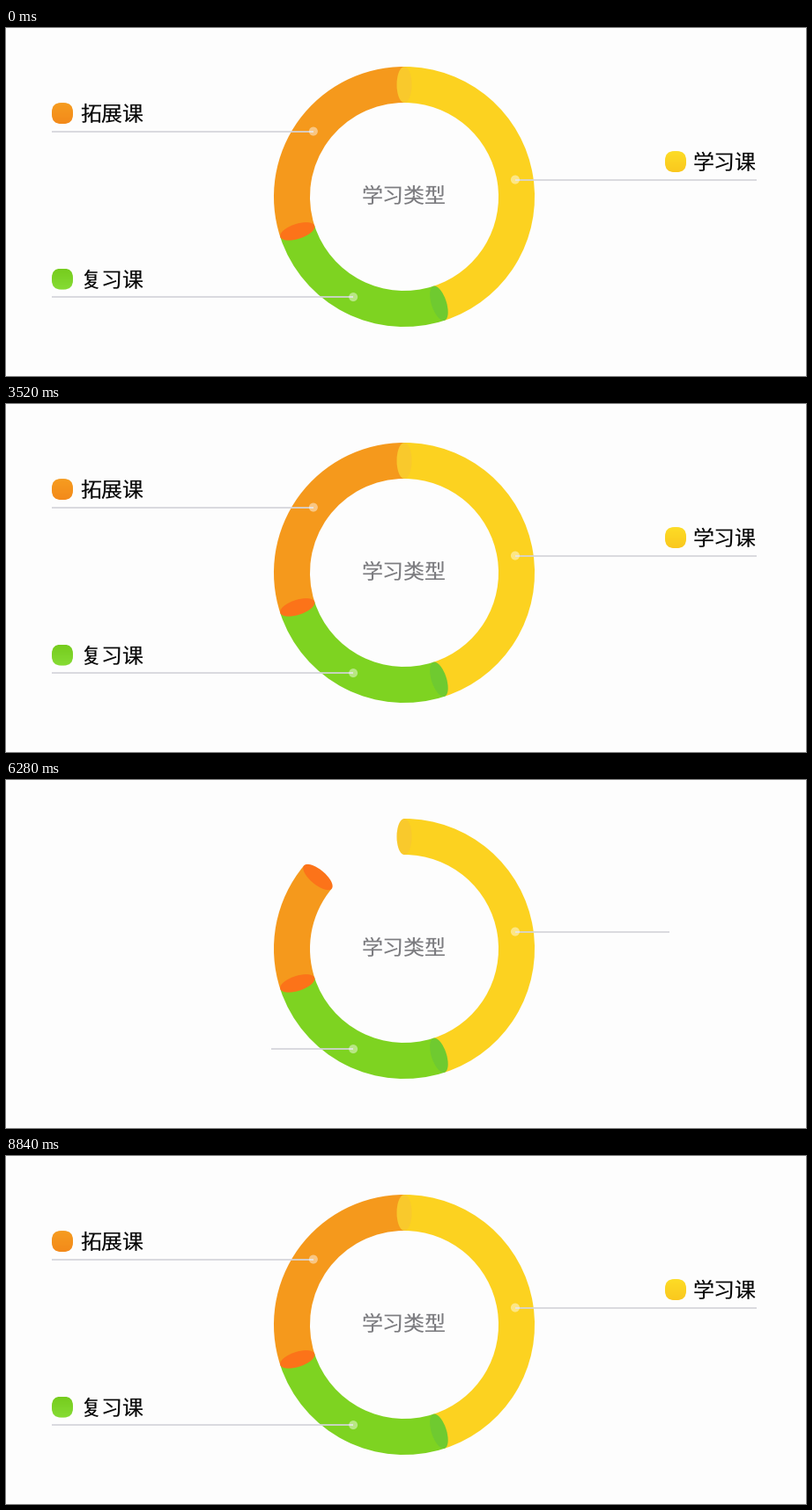
A matplotlib script for the animation above (8860 ms loop, 908 by 396 pixels).

```python
import numpy as np
import matplotlib.pyplot as plt
from matplotlib.animation import FuncAnimation
from matplotlib.colors import LinearSegmentedColormap
from matplotlib.patches import Circle, Ellipse, FancyBboxPatch, Wedge

W, H, DPI = 908, 396, 100
STEP, LOOP = 20, 8860            # ms
PX = 72 / DPI                    # points per pixel
CX, CY, R, THICK = 452, 192, 148, 41
MID = R - THICK / 2

RESTART = 4700                   # the finished chart is cleared here
SWEEP_AT, SWEEP = 4804, 2006
LINE_WAIT, LINE = 40, 760
LABEL_WAIT, LABEL = 140, 200

plt.rcParams["font.family"] = ["Noto Sans CJK JP", "DejaVu Sans"]
plt.rcParams["text.hinting"] = "none"
plt.rcParams["toolbar"] = "None"
fig = plt.figure(figsize=(W / DPI, H / DPI), dpi=DPI, facecolor="#fdfdfd")
ax = fig.add_axes([0, 0, 1, 1])
ax.axis("off")


def ease(p):
    p = min(max(p, 0), 1)
    return 2 * p * p if p < 0.5 else 1 - 2 * (1 - p) ** 2


def time_at(deg):
    """Moment at which the sweep reaches an angle."""
    f = deg / 360
    p = np.sqrt(f / 2) if f < 0.5 else 1 - np.sqrt((1 - f) / 2)
    return SWEEP_AT + SWEEP * p


def on_ring(deg):
    a = np.radians(deg)
    return CX + MID * np.sin(a), CY - MID * np.cos(a)


def cap(deg, color, z):
    return ax.add_patch(Ellipse(on_ring(deg), 17, THICK, angle=deg,
                                fc=color, lw=0, zorder=z))


def write(x, y, s, color):
    return ax.text(x, y, s, size=24 * PX, color=color, va="baseline", zorder=7)


class Segment:
    def __init__(self, name, start, end, body, rim, tip, shades, line_x, left):
        self.start, self.end, self.line_x = start, end, line_x
        self.wedge = ax.add_patch(Wedge((CX, CY), R, start - 90, end - 90,
                                        width=THICK, fc=body, lw=0, zorder=1))
        self.tip = cap(end, tip, 2)
        self.rim = cap(start, rim, 3)

        self.x, y = on_ring((start + end) / 2)
        self.y = y + 0.5
        self.line, = ax.plot([], [], color="#d4d4da", lw=2 * PX, alpha=0.85,
                             solid_capstyle="butt", zorder=4)
        self.dot = ax.add_patch(Circle((self.x, self.y), 5, fc="#ffffff",
                                       alpha=0.45, lw=0, zorder=5))

        mid = y - 20
        box = FancyBboxPatch((left + 10, mid - 2), 4, 4, lw=0, fc="none",
                             boxstyle="round,pad=10,rounding_size=10.5")
        ax.add_patch(box)
        icon = ax.imshow(np.linspace(0, 1, 32)[:, None], aspect="auto", zorder=6,
                         cmap=LinearSegmentedColormap.from_list(name, shades),
                         extent=(left, left + 24, mid + 12, mid - 12))
        icon.set_clip_path(box)
        self.label = [icon, write(left + 32, mid + 9, name, "#080808")]

        self.line_at = time_at(end) + LINE_WAIT
        self.label_at = self.line_at + LINE + LABEL_WAIT

    def show(self, t, sweep):
        on = sweep > self.start or self.start == 0
        done = sweep >= self.end
        head = min(sweep, self.end)
        self.wedge.set_visible(sweep > self.start)
        self.wedge.set_theta2(max(head, self.start + 0.01) - 90)
        self.rim.set_visible(on)
        self.tip.set_visible(on and not done)
        self.tip.set_center(on_ring(head))
        self.tip.set_angle(head)

        p = np.clip((t - self.line_at) / LINE, 0, 1)
        self.line.set_data([self.x, self.x + (self.line_x - self.x) * p],
                           [self.y, self.y])
        self.line.set_visible(p > 0)
        self.dot.set_visible(p > 0)

        fade = float(np.clip((t - self.label_at) / LABEL, 0, 1))
        for part in self.label:
            part.set_visible(fade > 0)
            part.set_alpha(fade)


segments = [
    Segment("学习课", 0, 162, "#fcd220", "#f9c92c", "#fbd020",
            ["#fddc26", "#fac81e"], 852, 748),
    Segment("复习课", 162, 252, "#7ed321", "#6fca30", "#6fca30",
            ["#76cc1e", "#86dc34"], 52, 52),
    Segment("拓展课", 252, 360, "#f5991c", "#fc7319", "#fc7319",
            ["#f69c20", "#f38a1a"], 52, 52),
]
write(404, 199.5, "学习类型", "#7c7c80")
ax.set_xlim(0, W)
ax.set_ylim(H, 0)


def update(i):
    t = i * STEP
    if t < RESTART:
        t += LOOP
    sweep = 360 * ease((t - SWEEP_AT) / SWEEP)
    for seg in segments:
        seg.show(t, sweep)
    return []


anim = FuncAnimation(fig, update, frames=LOOP // STEP, interval=STEP,
                     repeat=True, repeat_delay=0, blit=False)
plt.show()
```
